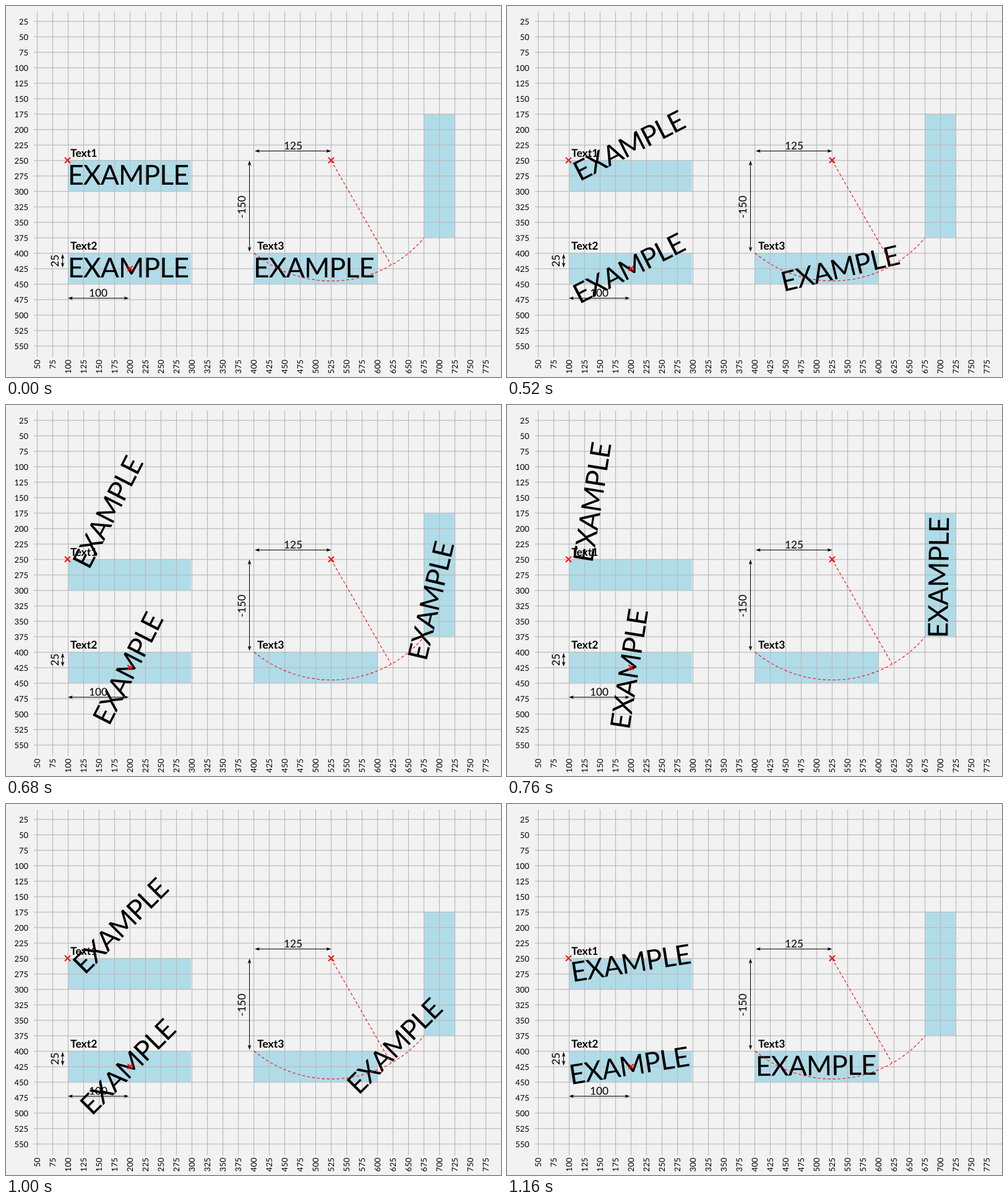
An HTML page that plays this animation: 800x600 px, repeating every 1.2 s.

```html
<!DOCTYPE html>
<html lang="en">
<head>
<meta charset="utf-8">
<title>Text rotation around an origin</title>
<style>
  html, body { margin: 0; width: 100%; height: 100%; overflow: hidden; background: #f2f2f2; }
  svg { display: block; width: 800px; height: 600px; }
  text { font-family: Lato, "Open Sans", sans-serif; fill: #000; text-rendering: geometricPrecision; }
  .box { fill: #b0dce9; }
  .grid { stroke: #bbb; stroke-width: 1.2; }
  .tick { font-size: 13px; text-anchor: end; }
  .sample { font-size: 44.5px; letter-spacing: -.9px; }
  .label { font-size: 17.5px; font-weight: 700; }
  .size { font-size: 17.3px; text-anchor: middle; }
  .arrow { fill: none; stroke: #000; stroke-width: 1; }
  .cross { fill: none; stroke: #f00; stroke-width: 1.8; }
  .dash { fill: none; stroke: #f00; stroke-width: 1.1; stroke-dasharray: 4.5 3.5; }
</style>
</head>
<body>
<svg id="stage" viewBox="0 0 800 600"></svg>
<script>
const stage = document.getElementById('stage');

function add(tag, attrs, content = '') {
  const node = document.createElementNS('http://www.w3.org/2000/svg', tag);
  for (const key in attrs) node.setAttribute(key, attrs[key]);
  node.textContent = content;
  return stage.appendChild(node);
}

const path = (cls, d) => add('path', { class: cls, d });
const box = (x, y, width, height) => add('rect', { class: 'box', x, y, width, height });

function write(cls, x, y, content, upright = false) {
  const attrs = { class: cls, x, y };
  if (upright) attrs.transform = `rotate(-90 ${x} ${y})`;
  return add('text', attrs, content);
}

function arrow(x, y, length, vertical = false) {
  const head = (tip, dir) =>
    `M${tip} 0L${tip + 8 * dir} -2.8L${tip + 6 * dir} 0L${tip + 8 * dir} 2.8Z`;
  const transform = `translate(${x} ${y})` + (vertical ? ' rotate(90)' : '');
  add('path', { class: 'arrow', transform, d: `M4 0H${length - 4}` });
  add('path', { transform, d: head(0, 1) + head(length, -1) });
}

function cross(x, y, r) {
  path('cross', `M${x - r} ${y - r}l${2 * r} ${2 * r}m0 ${-2 * r}l${-2 * r} ${2 * r}`);
}

box(100, 249.5, 199, 50);
box(100, 399.5, 199, 50);
box(400.5, 399.5, 200, 50);
box(675, 174.5, 50.5, 200);

for (let x = 50; x <= 775; x += 25) {
  path('grid', `M${x + .5} 9V568`);
  write('tick', x + 5, 572, x, true);
}
for (let y = 25; y <= 550; y += 25) {
  path('grid', `M45 ${y - .2}H800`);
  write('tick', 36, y + 5, y);
}

// Cycloid easing: slow start and end, fast middle
const smooth = u => u - Math.sin(2 * Math.PI * u) / (2 * Math.PI);
const linear = u => u;

const samples = [
  { x: 100, y: 288.5, pivot: '100 250', ease: linear },
  { x: 100, y: 438.5, pivot: '200 425', ease: linear },
  { x: 400, y: 438.5, pivot: '525 250', ease: smooth }
];
for (const s of samples) s.node = write('sample', s.x, s.y, 'EXAMPLE');

write('label', 104, 244, 'Text1');
write('label', 104, 394, 'Text2');
write('label', 406, 394, 'Text3');

arrow(402, 234.5, 123.5);
arrow(100, 472.5, 98.5);
arrow(393.5, 250, 147.5, true);
arrow(91.5, 401, 22, true);
write('size', 464, 232, '125');
write('size', 149, 470, '100');
write('size', 387, 325, '-150', true);
write('size', 85, 412, '25', true);

path('dash', 'M525.5 250L622.5 419');
path('dash', 'M401 399.5A195.3 195.3 0 0 0 675.5 375');
cross(99.5, 249.5, 4.5);
cross(525.5, 249.5, 4.5);
cross(200.5, 424.5, 4);

const LOOP = 1200, STEP = 40;

// Hold for 10 steps, turn up for 10, turn back for 10
function draw(now) {
  const step = Math.floor((now % LOOP) / STEP + .001);
  const turn = Math.max(0, 10 - Math.abs(step - 20)) / 10;
  for (const { node, pivot, ease } of samples)
    node.setAttribute('transform', `rotate(${-90 * ease(turn)} ${pivot})`);
  requestAnimationFrame(draw);
}
draw(0);
</script>
</body>
</html>
```
